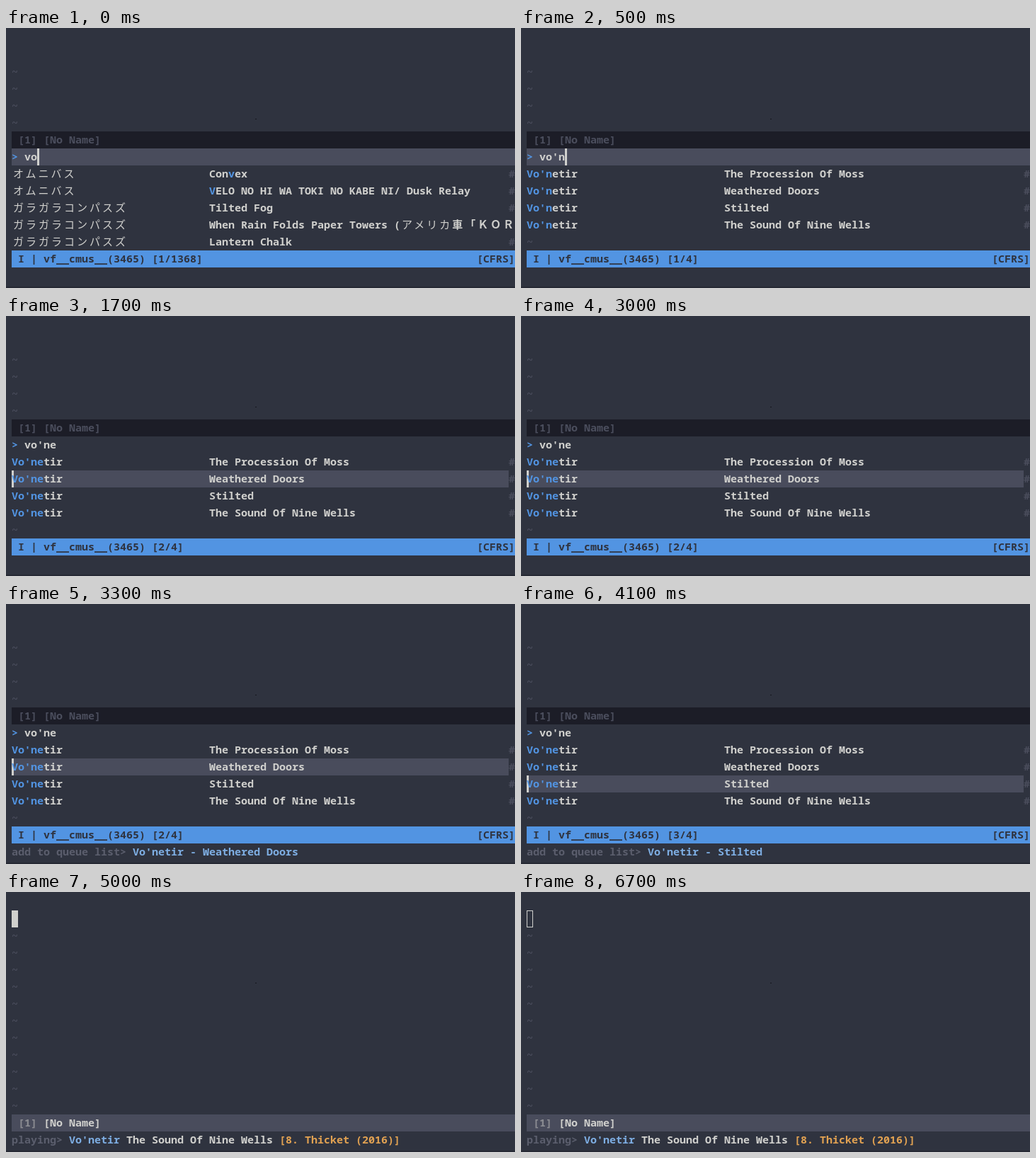
Recreate the animation shown at these times as an HTML page. Size 719 by 367 pixels, loop 6800 ms.

```html
<!DOCTYPE html>
<html lang="ja">
<head>
<meta charset="utf-8">
<title>Music picker</title>
<style>
  html, body { margin: 0; width: 100%; height: 100%; overflow: hidden; background: #2f333f; }
  svg { display: block; width: 719px; height: 367px; }
  text { font: 600 15px "Noto Sans Mono", "DejaVu Sans Mono", monospace; white-space: pre; }
  .wide { font: 400 15px "Noto Sans CJK JP", "Noto Sans CJK", sans-serif; letter-spacing: 3px; }
  .heavy { font-weight: 700; }
</style>
</head>
<body>
<svg id="stage" viewBox="0 0 719 367"></svg>
<script>
const LOOP = 6800;
const CELL = 9, LINE = 24, LEFT = 8, TOP = 2;
const C = {
  bg: '#2f333f', dim: '#4b4e5d', bar: '#494c5c', dark: '#1c1d27', fg: '#d0d0cd',
  blue: '#5294e2', sky: '#7eaee3', orange: '#e2a252', label: '#5b5e6d', number: '#8b8c92'
};
const ARTIST = "Vo'netir";
const QUERY = "vo'ne";
const TRACKS = ['The Procession Of Moss', 'Weathered Doors', 'Stilted', 'The Sound Of Nine Wells'];
const BAND = 'ガラガラコンパスズ';
const MIXED = [
  ['オムニバス', 'Convex', 3],
  ['オムニバス', 'VELO NO HI WA TOKI NO KABE NI/ Dusk Relay', 0],
  [BAND, 'Tilted Fog'],
  [BAND, 'When Rain Folds Paper Towers ('],
  [BAND, 'Lantern Chalk']
];

// Each step holds until the next; fields carry over.
const STEPS = [
  { at: 0, typed: 2, matched: 0, row: 0, queued: 0, playing: false, hollow: false },
  { at: 200, typed: 3 },
  { at: 300, matched: 3 },
  { at: 400, typed: 4, matched: 4 },
  { at: 600, typed: 5, matched: 5 },
  { at: 1500, row: 1 },
  { at: 1600, row: 2 },
  { at: 3100, queued: 2 },
  { at: 3500, row: 3 },
  { at: 3800, queued: 3 },
  { at: 4400, row: 4 },
  { at: 5000, playing: true },
  { at: 6000, hollow: true }
];

const px = col => LEFT + col * CELL;
const py = line => TOP + line * LINE;
const rect = (x, y, w, h, fill, extra = '') =>
  `<rect x="${x}" y="${y}" width="${w}" height="${h}" fill="${fill}" ${extra}/>`;
const band = (line, fill, right = 719) => rect(LEFT, py(line), right - LEFT, LINE, fill);
const text = (col, line, str, fill) =>
  `<text x="${px(col)}" y="${py(line) + 17}" fill="${fill}">${str.replace(/>/g, '&gt;')}</text>`;
const wide = (col, line, markup) =>
  `<text class="wide" x="${px(col) + 2}" y="${py(line) + 17}" fill="${C.fg}">${markup}</text>`;
const tildes = (from, to) => {
  let out = '';
  for (let line = from; line <= to; line++) out += text(0, line, '~', C.dim);
  return out;
};

// Lays out coloured pieces one after another on a line.
function run(col, line, ...pieces) {
  return pieces.map(([str, fill]) => {
    const out = text(col, line, str, fill);
    col += str.length;
    return out;
  }).join('');
}

function title(line, str, hit) {
  if (hit === undefined) return text(31, line, str, C.fg);
  return run(31, line, [str.slice(0, hit), C.fg], [str[hit], C.blue], [str.slice(hit + 1), C.fg]);
}

function mixedList() {
  return MIXED.map(([artist, name, hit], i) => {
    const line = 8 + i;
    const tail = i === 3
      ? wide(61, line, 'アメリカ<tspan class="heavy">車「ＫＯＲ</tspan>')
      : text(78, line, '#', C.dim);
    return wide(0, line, artist) + title(line, name, hit) + tail;
  }).join('');
}

function matchedList(count) {
  return TRACKS.map((name, i) => {
    const line = 8 + i;
    return run(0, line, [ARTIST.slice(0, count), C.blue], [ARTIST.slice(count), C.fg]) +
      title(line, name) + text(78, line, '#', C.dim);
  }).join('') + tildes(12, 12);
}

function picker(s) {
  const line = 7 + s.row;
  const caret = s.row ? 0 : 2 + s.typed;
  const total = s.matched ? 4 : 1368;
  let out = tildes(2, 5) + band(6, C.dark) + text(1, 6, '[1] [No Name]', C.dim);
  out += band(line, C.bar, s.row ? 710 : 719) + rect(px(caret), py(line), 3, LINE, C.fg);
  out += run(0, 7, ['> ', C.blue], [QUERY.slice(0, s.typed), C.fg]);
  out += s.matched ? matchedList(s.matched) : mixedList();
  out += band(13, C.blue) + text(1, 13, `I | vf__cmus__(3465) [${s.row || 1}/${total}]`, C.bg);
  out += text(73, 13, '[CFRS]', C.bg);
  if (s.queued) {
    out += run(0, 14, ['add to queue list> ', C.label], [`${ARTIST} - ${TRACKS[s.queued - 1]}`, C.sky]);
  }
  return out;
}

function player(s) {
  const cursor = s.hollow
    ? rect(LEFT + .5, py(1) + .5, CELL - 1, LINE - 1, 'none', `stroke="${C.fg}"`)
    : rect(LEFT, py(1), CELL, LINE, C.fg);
  return cursor + tildes(2, 12) + band(13, C.bar) +
    run(1, 13, ['[1] ', C.number], ['[No Name]', C.fg]) +
    run(0, 14, ['playing> ', C.label], [ARTIST + ' ', C.sky], [TRACKS[3] + ' ', C.fg],
      ['[8. Thicket (2016)]', C.orange]);
}

const stage = document.getElementById('stage');
let shown = -1;

function draw(time) {
  const past = STEPS.filter(step => step.at <= time);
  if (past.length === shown) return;
  shown = past.length;
  const state = Object.assign({}, ...past);
  stage.innerHTML = rect(0, 0, 719, 367, C.bg) +
    (state.playing ? player(state) : picker(state)) +
    rect(352, 128, 2, 1, '#15161c') + rect(0, 365, 719, 2, '#262934');
}

const start = performance.now();
function tick() {
  draw((performance.now() - start) % LOOP);
  requestAnimationFrame(tick);
}
tick();
</script>
</body>
</html>
```
